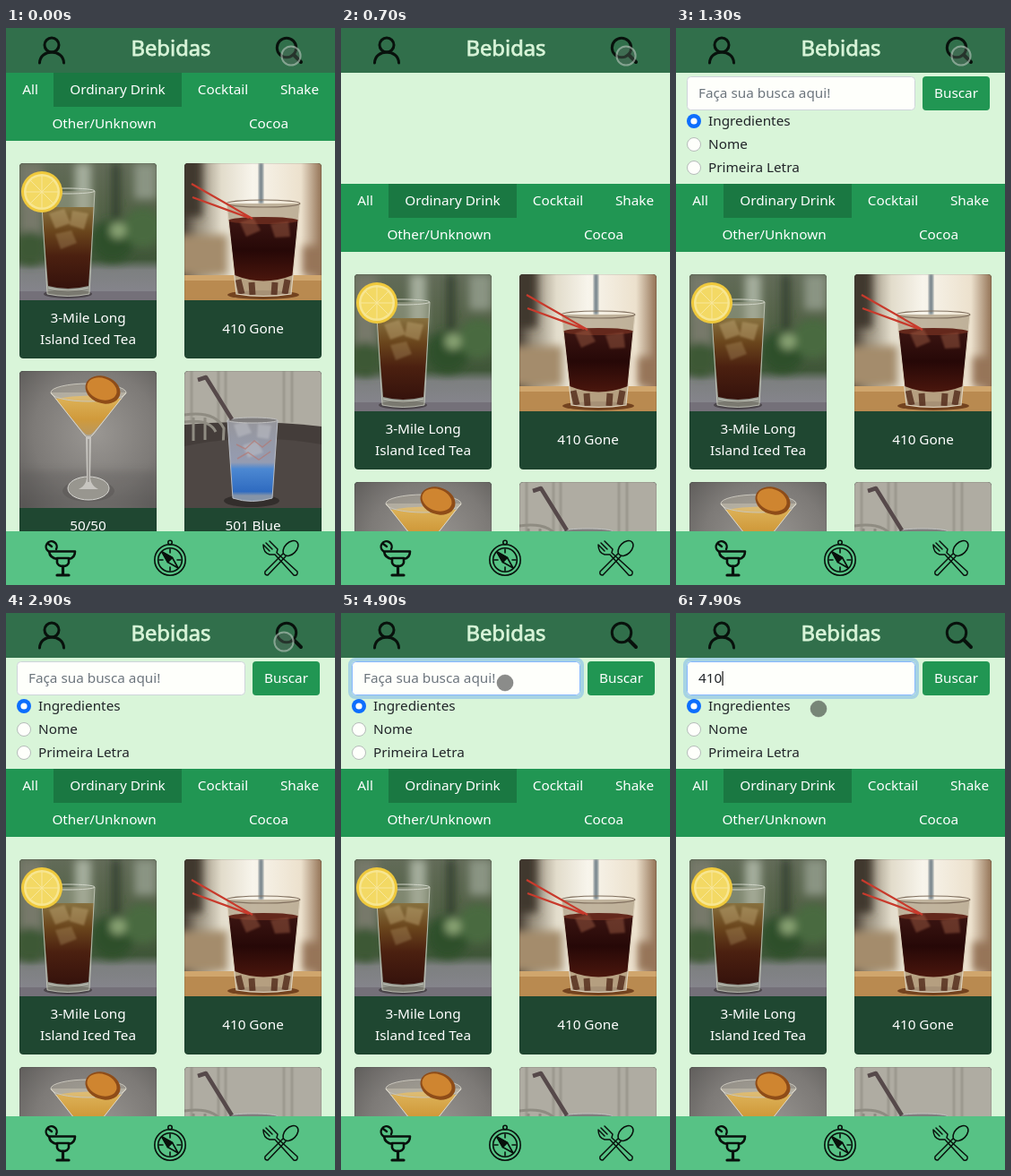
Recreate the animation shown at these times as an HTML page. Size 367 px wide and 622 px high, loop 8000 ms.

```html
<!DOCTYPE html>
<html lang="pt">
<head>
<meta charset="utf-8">
<title>Bebidas</title>
<style>
  html, body { margin: 0; width: 100%; height: 100%; overflow: hidden; background: #d9f5d9; }
  #stage { display: block; width: 367px; height: 622px; }
  text { font: 15.3px "Noto Sans", "Open Sans", sans-serif; fill: #fff; }
  .mid text, text.mid { text-anchor: middle; }
  text.title { font-size: 23.8px; font-weight: 500; fill: #d9f5d9; stroke: #d9f5d9; stroke-width: .75; }
  .dark text { fill: #212529; }
  .icon { fill: none; stroke: #08110c; stroke-width: 3; stroke-linecap: round; stroke-linejoin: round; }
  .solid { fill: #08110c; }
</style>
</head>
<body>
<svg id="stage" viewBox="0 0 367 622">
  <defs>
    <clipPath id="card"><rect width="153" height="218" rx="4"/></clipPath>
    <filter id="blur" x="-30%" y="-30%" width="160%" height="160%"><feGaussianBlur stdDeviation="5"/></filter>
    <filter id="soft"><feGaussianBlur stdDeviation="1.2"/></filter>
    <linearGradient id="garden" x2="0" y2="1">
      <stop stop-color="#626b58"/><stop offset=".3" stop-color="#556349"/>
      <stop offset=".7" stop-color="#3f5638"/><stop offset=".78" stop-color="#7d8080"/><stop offset="1" stop-color="#888690"/>
    </linearGradient>
    <linearGradient id="tea" x2="0" y2="1">
      <stop stop-color="#87713f"/><stop offset=".3" stop-color="#6a451c"/>
      <stop offset=".6" stop-color="#4b2010"/><stop offset="1" stop-color="#35120c"/>
    </linearGradient>
    <linearGradient id="window">
      <stop stop-color="#4d4439"/><stop offset=".1" stop-color="#978e7c"/><stop offset=".27" stop-color="#e2dccb"/>
      <stop offset=".5" stop-color="#f8f5ec"/><stop offset=".85" stop-color="#ece1cd"/><stop offset="1" stop-color="#937255"/>
    </linearGradient>
    <linearGradient id="cola" x2="0" y2="1">
      <stop stop-color="#3b1512"/><stop offset=".5" stop-color="#260807"/><stop offset="1" stop-color="#4a160d"/>
    </linearGradient>
    <radialGradient id="studio" cx=".55" cy=".45" r=".75">
      <stop stop-color="#9a9793"/><stop offset=".6" stop-color="#7d7a77"/><stop offset="1" stop-color="#5b5957"/>
    </radialGradient>
    <linearGradient id="amber" x2="0" y2="1">
      <stop stop-color="#deb45b"/><stop offset=".6" stop-color="#d09a3b"/><stop offset="1" stop-color="#b9985f"/>
    </linearGradient>
    <linearGradient id="frost" x2="0" y2="1">
      <stop stop-color="#96969b"/><stop offset=".52" stop-color="#959cb2"/>
      <stop offset=".6" stop-color="#4c88d2"/><stop offset=".88" stop-color="#2f6bc0"/><stop offset=".93" stop-color="#8594a8"/>
    </linearGradient>
  </defs>

  <g id="page">
    <rect y="50" width="367" height="76" fill="#219653"/>
    <rect x="53" y="50" width="143" height="38" fill="#1a7842"/>
    <g class="mid">
      <text x="27" y="74">All</text><text x="124.5" y="74">Ordinary Drink</text>
      <text x="242" y="74">Cocktail</text><text x="327.5" y="74">Shake</text>
      <text x="109.5" y="112">Other/Unknown</text><text x="293" y="112">Cocoa</text>
    </g>

    <g class="card" transform="translate(15 151)">
      <svg width="153" height="153">
        <rect width="153" height="153" fill="url(#garden)"/>
        <g filter="url(#blur)">
          <path d="M0 0H26V112H0Z" fill="#77796b"/><path d="M62 0H80V60H62Z" fill="#a4ad9c"/>
          <path d="M104 0H111V70H104Z" fill="#2c3726"/><path d="M128 0H153V40H128Z" fill="#8a9483"/>
          <circle cx="104" cy="87" r="24" fill="#2f502b"/><circle cx="138" cy="72" r="22" fill="#4a6b40"/>
          <circle cx="110" cy="75" r="9" fill="#8aa474"/><circle cx="12" cy="95" r="19" fill="#3c5836"/>
        </g>
        <path d="M0 143H153V153H0Z" fill="#747079"/>
        <ellipse cx="54" cy="146" rx="27" ry="5" fill="#4b464b"/>
        <path d="M24 31H84L78 146Q54 151 31 146Z" fill="#a0a58e" opacity=".55"/>
        <path d="M25 49H83L77 137Q54 143 32 137Z" fill="url(#tea)"/>
        <g fill="#c1a876" opacity=".45" filter="url(#soft)">
          <path d="M33 56l17-5 7 16-17 6Z"/><path d="M59 53l18 3-5 18-16-5Z"/><path d="M40 79l18-4 6 14-18 7Z" opacity=".65"/>
        </g>
        <path d="M24 31L31 146Q54 151 78 146L84 31M32 139Q54 145 77 139" fill="none" stroke="#d8dace" opacity=".7"/>
        <ellipse cx="54" cy="31" rx="30" ry="3" fill="none" stroke="#d1d5c8"/>
        <circle cx="25" cy="32" r="23" fill="#efc93c"/>
        <circle cx="25" cy="32" r="20" fill="#f7e692"/>
        <circle cx="25" cy="32" r="17.5" fill="#f3d964"/>
        <path d="M25 14V50M7 32H43M12 19L38 45M12 45L38 19" stroke="#f8e79c"/>
      </svg>
      <text x="76.5" y="178">3-Mile Long</text><text x="76.5" y="202">Island Iced Tea</text>
    </g>

    <g class="card" transform="translate(199 151)">
      <svg width="153" height="153">
        <rect width="153" height="153" fill="url(#window)"/>
        <g filter="url(#blur)">
          <path d="M-8 -8H20V60H-8Z" fill="#41382d"/><path d="M-8 80H48V125H-8Z" fill="#a48c6c"/>
          <path d="M132 92H165V125H132Z" fill="#967458"/>
        </g>
        <path d="M83 0H88V45H83Z" fill="#7e8b91" filter="url(#soft)"/>
        <path d="M0 125H153V153H0Z" fill="#b98a50"/><path d="M0 125H153V131H0Z" fill="#d0a66d"/>
        <ellipse cx="88" cy="147" rx="40" ry="5" fill="#73431f"/>
        <path d="M47 45H129L119 146Q88 151 58 146Z" fill="#b5a58d" opacity=".8"/>
        <path d="M49 63H127L121 125Q88 138 56 125Z" fill="url(#cola)"/>
        <ellipse cx="88" cy="64" rx="39" ry="4" fill="#64281c"/>
        <g fill="#9a5a42" opacity=".5" filter="url(#soft)">
          <path d="M62 66l15-5 8 14-16 7Z"/><path d="M96 68l20-3 2 17-17 1Z"/>
        </g>
        <path d="M60 130L64 146M75 133L76 147M101 133L100 147M115 130L112 146" stroke="#4a2012" stroke-width="7" opacity=".75"/>
        <path d="M47 45L58 146Q88 151 119 146L129 45" fill="none" stroke="#ded2bd" stroke-width="1.2"/>
        <ellipse cx="88" cy="45" rx="41" ry="4" fill="none" stroke="#81705f" stroke-width="1.2"/>
        <path d="M8 23L76 62M9 38L72 61" stroke="#c83a2c" stroke-width="2.2"/>
      </svg>
      <text x="76.5" y="190">410 Gone</text>
    </g>

    <g class="card" transform="translate(15 383)">
      <svg width="153" height="153">
        <rect width="153" height="153" fill="url(#studio)"/>
        <path d="M0 112H153V153H0Z" fill="#4c4a49" opacity=".25" filter="url(#blur)"/>
        <ellipse cx="77" cy="134" rx="29" ry="12" fill="#5c5958" opacity=".6"/>
        <path d="M35 24H119L82 71Q77 78 72 71Z" fill="#c8c1b2" opacity=".5"/>
        <path d="M40 31Q77 24 114 31L83 68Q77 75 71 68Z" fill="url(#amber)"/>
        <ellipse cx="77" cy="24" rx="42" ry="10" fill="#d9d1bd" fill-opacity=".25" stroke="#c9c6bc"/>
        <path d="M35 24L72 71Q77 78 82 71L119 24" fill="none" stroke="#dedacd"/>
        <ellipse cx="77" cy="131" rx="23" ry="13" fill="#98968f" stroke="#d6d5d1"/>
        <path d="M74 73H80L79 120Q80 128 88 132H66Q74 128 75 120Z" fill="#c7c5c0"/>
        <path d="M77 76V124" stroke="#77736f"/>
        <ellipse cx="93" cy="21" rx="20" ry="15" transform="rotate(20 93 21)" fill="#8e4c18"/>
        <ellipse cx="92" cy="20" rx="17" ry="12" transform="rotate(20 92 20)" fill="#cf8530"/>
      </svg>
      <text x="76.5" y="178">50/50</text>
    </g>

    <g class="card" transform="translate(199 383)">
      <svg width="153" height="153">
        <rect width="153" height="153" fill="#afaca2"/>
        <path d="M8 0V58M38 0V58M46 0V58M111 0V58M120 0V58" stroke="#918e84" stroke-width="2" filter="url(#soft)"/>
        <path d="M0 60Q76 53 153 62V153H0Z" fill="#443d3a"/>
        <path d="M0 49Q34 44 44 64L43 86M0 57Q28 53 35 68M10 52V78M23 52V77" fill="none" stroke="#8f8c82" stroke-width="3"/>
        <path d="M0 84Q76 68 153 82V153H0Z" fill="#4e4744"/>
        <ellipse cx="75" cy="145" rx="31" ry="7" fill="#332e2c"/>
        <path d="M48 55H104L98 142Q75 149 54 142Z" fill="url(#frost)"/>
        <g fill="#c6c8ce" opacity=".45" filter="url(#soft)">
          <path d="M55 60l14-4 6 13-15 5Z"/><path d="M82 59l15 2-3 15-13-2Z"/><path d="M65 83l16-5 7 13-17 6Z"/>
        </g>
        <path d="M58 82l10 5 10-9 9 7 10-8M59 98l12-7 12 8 13-9" fill="none" stroke="#b8746c" stroke-width="1.5" opacity=".6"/>
        <path d="M48 55L54 142Q75 149 98 142L104 55" fill="none" stroke="#b9bdc4"/>
        <ellipse cx="76" cy="55" rx="28" ry="3" fill="#7f7d7d" stroke="#c0c0c0"/>
        <path d="M15 10L24 7L53 54" fill="none" stroke="#56494a" stroke-width="4.5" stroke-linejoin="round"/>
      </svg>
      <text x="76.5" y="178">501 Blue</text>
    </g>
  </g>

  <rect width="367" height="50" fill="#316f4b"/>
  <text class="title mid" x="184" y="31">Bebidas</text>
  <g class="icon">
    <circle cx="51" cy="19" r="8"/><path d="M37.5 39C38 23 64 23 64.5 39"/>
    <circle cx="313" cy="22" r="10.7"/><path d="M321 30L329 38" stroke-width="4"/>
  </g>

  <g id="form">
    <rect id="glow" x="10" y="52" width="259" height="42" rx="6" fill="none" stroke="#0d6efd" stroke-width="4"/>
    <rect id="field" x="12.5" y="54.5" width="254" height="37" rx="4" fill="#fefffb"/>
    <text id="query" x="25" y="78"></text>
    <path id="caret" d="M0 65V81" stroke="#111" stroke-width="1.2"/>
    <rect x="275" y="54" width="75" height="38" rx="4" fill="#219653"/>
    <text class="mid" x="312.5" y="78">Buscar</text>
    <circle cx="20" cy="104" r="8" fill="#0d6efd"/><circle cx="20" cy="104" r="3.6" fill="#fff"/>
    <g fill="#fefffb" stroke="#b5bcb9"><circle cx="20" cy="130" r="7.5"/><circle cx="20" cy="156" r="7.5"/></g>
    <g class="dark">
      <text x="36" y="109">Ingredientes</text><text x="36" y="135">Nome</text><text x="36" y="161">Primeira Letra</text>
    </g>
  </g>

  <rect y="562" width="367" height="60" fill="#57c285"/>
  <g class="icon">
    <path d="M48 584.5H77Q77 592 70 593V597Q69 601 63.5 601Q58 601 57 597V593Q49 592 48 584.5ZM57 592H70" stroke-width="2.6"/>
    <path d="M63.5 601V610M57 611H70" stroke-width="3.2"/>
    <path d="M47 584A6 6 0 1 1 56 582M51 579L47 576" stroke-width="2.4"/>
    <g stroke-width="1.6">
      <circle cx="183" cy="594" r="17.2"/><circle cx="183" cy="594" r="13.3"/><circle cx="183" cy="574.5" r="2.2"/>
      <path d="M174 585L185.5 591.5L192 603L180.5 596.5ZM183 582V586M183 602V606M171 594H175M191 594H195"/>
      <path d="M174 585L185.5 591.5L180.5 596.5Z" class="solid"/>
    </g>
    <g stroke-width="1.5">
      <ellipse cx="317.5" cy="581" rx="10" ry="6.5" transform="rotate(-45 317.5 581)"/>
      <path d="M309 587L289 607Q288 611 292 611L312 590"/>
      <path d="M287 577L294 584M290 575L297 582M294 573L301 580M287 577Q287 586 294 588L300 588L321 611Q326 612 325 607L302 586L303 582L301 580"/>
    </g>
  </g>
  <circle id="pointer"/>
</svg>

<script>
const $ = id => document.getElementById(id);
const LOOP = 8000;
const FORM_HEIGHT = 124;
const OPEN_AT = 700;
const OPEN_TIME = 600;

// time, x, y: the pointer holds each position until the next one
const pointerPath = [
  [0, 318, 31], [2900, 310, 32], [3100, 314, 33], [3200, 301, 40], [3300, 267, 60], [3400, 222, 76],
  [3500, 195, 82], [3600, 254, 83], [3800, 229, 82], [3900, 201, 79], [4000, 183, 78],
  [7400, 190, 81], [7500, 197, 85], [7800, 199, 95], [7900, 159, 107]
];
const typed = [[0, ""], [6200, "4"], [6400, "41"], [6700, "410"]];

const latest = (steps, t) => steps.filter(step => step[0] <= t).pop();
const clamp = x => Math.max(0, Math.min(1, x));
const set = (id, attributes) => {
  for (const name in attributes) $(id).setAttribute(name, attributes[name]);
};

// CSS "ease": cubic-bezier(.25, .1, .25, 1), solved for x by bisection
function ease(x) {
  const bezier = (a, b, s) => 3 * a * s * (1 - s) ** 2 + 3 * b * s * s * (1 - s) + s ** 3;
  let low = 0, high = 1;
  for (let i = 0; i < 20; i++) {
    const s = (low + high) / 2;
    if (bezier(0.25, 0.25, s) < x) low = s; else high = s;
  }
  return bezier(0.1, 1, high);
}

for (const card of document.querySelectorAll(".card")) {
  card.classList.add("mid");
  card.setAttribute("clip-path", "url(#card)");
  const rect = extra => `<rect width="153" height="218" rx="4" ${extra}/>`;
  card.innerHTML = rect('fill="#1f4731"') + card.innerHTML + rect('fill="none" stroke="#000" stroke-opacity=".2"');
}

function drawForm(t) {
  const time = t < 1300 ? Math.min(t, 1100) : t;
  const shown = time <= OPEN_AT ? 0 : ease(clamp((time - OPEN_AT) / OPEN_TIME));
  set("form", { opacity: shown, transform: `translate(0 ${FORM_HEIGHT * (shown - 1)})` });

  const focus = t < 4300 ? 0 : t < 4400 ? 0.5 : 1;
  set("glow", { "stroke-opacity": focus * 0.25 });
  set("field", { stroke: focus ? "#86b7fe" : "#ced4da" });

  const value = latest(typed, t)[1];
  const query = $("query");
  query.textContent = value || "Faça sua busca aqui!";
  query.style.fill = value ? "#212529" : "#6c757d";
  const caretX = 25.8 + (value ? query.getComputedTextLength() : 0);
  const caretOn = (t >= 4300 && t < 4900) || (t >= 5500 && t < 7400) || t >= 7800;
  set("caret", { transform: `translate(${caretX} 0)`, opacity: caretOn ? 1 : 0 });
}

function drawPointer(t) {
  const [, cx, cy] = latest(pointerPath, t);
  const look = cy < 50
    ? { r: 10.6, fill: "rgba(85,105,93,.4)", stroke: "rgba(185,200,190,.6)", "stroke-width": 2 }
    : { r: 9, fill: "rgba(0,0,0,.45)", stroke: "rgba(90,90,90,.4)", "stroke-width": 1 };
  set("pointer", { cx, cy, ...look });
}

function frame() {
  const t = Math.floor(performance.now() % LOOP / 100) * 100;
  set("page", { transform: `translate(0 ${t < OPEN_AT ? 0 : FORM_HEIGHT})` });
  drawForm(t);
  drawPointer(t);
  requestAnimationFrame(frame);
}
frame();
</script>
</body>
</html>
```
